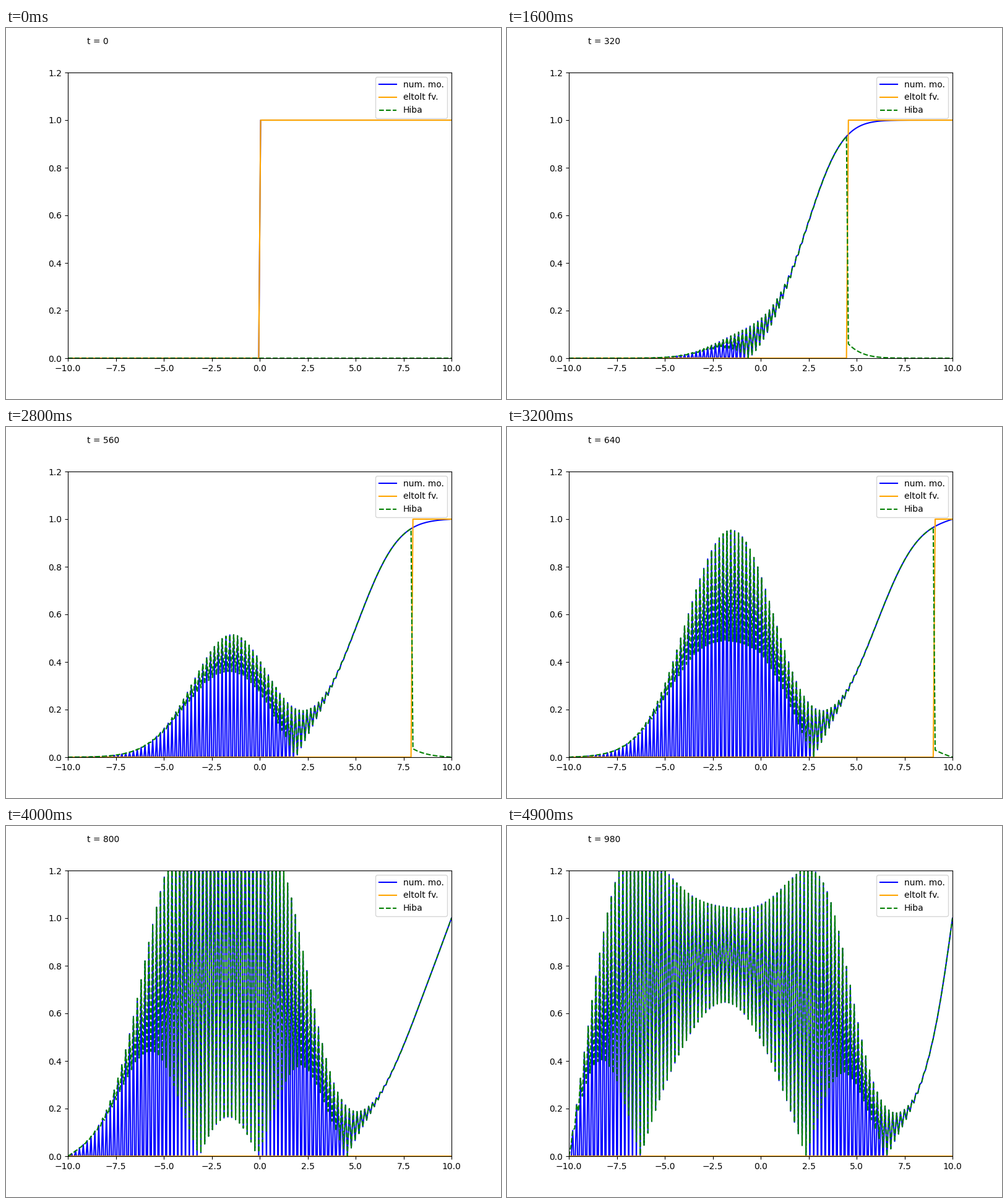
These frames come from a looping animation (800x600 px, 5 s). A matplotlib script:

```python
import numpy as np
import matplotlib.pyplot as plt
from matplotlib.animation import FuncAnimation

FRAMES = 50
INTERVAL = 100
STEPS_PER_FRAME = 20

N = 200
DX = 20 / N
DT = DX**2 / 2
RATE = 2.0
SPEED = 2 * np.sqrt(RATE)

x = np.linspace(-10, 10, N)


def step(position):
    return np.where(x >= position, 1.0, 0.0)


def solve():
    """Explicit Euler for u_t = u_xx - RATE*u*(1-u), ends held fixed."""
    u = step(0)
    history = [u.copy()]
    for _ in range(STEPS_PER_FRAME * (FRAMES - 1)):
        diffusion = (u[2:] - 2 * u[1:-1] + u[:-2]) / DX**2
        reaction = -RATE * u[1:-1] * (1 - u[1:-1])
        u[1:-1] += DT * (diffusion + reaction)
        history.append(u.copy())
    return history[::STEPS_PER_FRAME]


solution = solve()

fig, ax = plt.subplots(figsize=(8, 6), dpi=100)
ax.set_xlim(-10, 10)
ax.set_ylim(0, 1.2)
numeric, = ax.plot([], [], color="blue", label="num. mo.")
shifted, = ax.plot([], [], color="orange", label="eltolt fv.")
error, = ax.plot([], [], "--", color="green", label="Hiba")
clock = ax.text(-9, 1.32, "")
ax.legend(loc="upper right")


def update(frame):
    n = frame * STEPS_PER_FRAME
    u = solution[frame]
    exact = step(SPEED * DT * n)
    numeric.set_data(x, u)
    shifted.set_data(x, exact)
    error.set_data(x, np.abs(u - exact))
    clock.set_text(f"t = {n}")
    return numeric, shifted, error, clock


anim = FuncAnimation(fig, update, frames=FRAMES, interval=INTERVAL,
                     repeat=True, repeat_delay=0)
plt.show()
```
